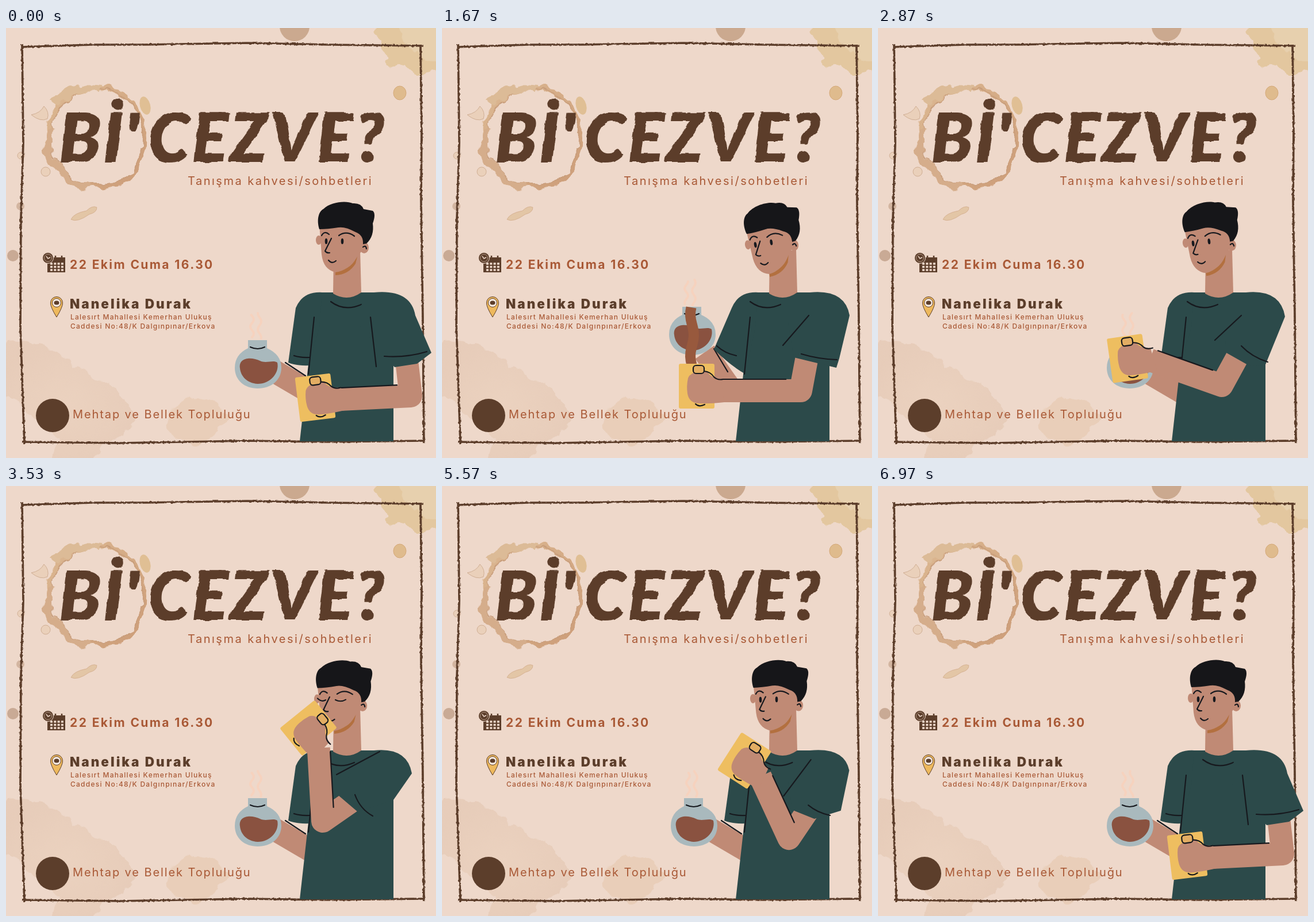
These frames come from a looping animation (748 by 748 pixels, 7010 ms). An HTML page:

```html
<!DOCTYPE html>
<html lang="tr">
<head>
<meta charset="utf-8">
<title>Bi' Cezve?</title>
<style>
  html, body { margin: 0; width: 100%; height: 100%; overflow: hidden; background: #eed8ca; }
  svg { display: block; width: 100vw; height: 100vh; }
  text { font-family: Inter, "Open Sans", sans-serif; fill: #a95936; }
  .title { font: italic 900 118px Lato, "Open Sans", sans-serif; letter-spacing: 3px; fill: #5c3e2b; }
  .light { font-size: 20px; font-weight: 400; }
  .date { font-size: 21px; font-weight: 700; letter-spacing: 2.4px; }
  .place { font-size: 22.5px; font-weight: 900; letter-spacing: 3px; fill: #5c3e2b; }
  .address { font-size: 12px; font-weight: 500; letter-spacing: 1.25px; }
  .ink { fill: none; stroke: #17191e; stroke-width: 2.2; stroke-linecap: round; stroke-linejoin: round; }
  .skin { fill: #c08a75; }
  .limb { fill: none; stroke: #c08a75; stroke-width: 40; stroke-linejoin: round; }
  .shirt { fill: #2c4a4a; }
  .brown { fill: #5c3e2b; }
</style>
</head>
<body>
<svg viewBox="0 0 748 748">
  <defs>
    <filter id="blotch" x="-20%" y="-20%" width="140%" height="140%">
      <feTurbulence type="fractalNoise" baseFrequency=".035" numOctaves="3" seed="4"/>
      <feDisplacementMap in="SourceGraphic" scale="22" xChannelSelector="R" yChannelSelector="G"/>
    </filter>
    <filter id="crayon" filterUnits="userSpaceOnUse" x="0" y="0" width="748" height="748">
      <feTurbulence type="fractalNoise" baseFrequency=".22" numOctaves="2" seed="7"/>
      <feDisplacementMap in="SourceGraphic" scale="3.5" xChannelSelector="R" yChannelSelector="G"/>
    </filter>
    <filter id="brush" filterUnits="userSpaceOnUse" x="0" y="0" width="748" height="748">
      <feTurbulence type="fractalNoise" baseFrequency=".05" numOctaves="2" seed="3"/>
      <feDisplacementMap in="SourceGraphic" scale="6" xChannelSelector="R" yChannelSelector="G"/>
    </filter>
    <linearGradient id="ringTone" x2="1" y2="1">
      <stop offset="0" stop-color="#dcb892"/><stop offset="1" stop-color="#cc9c77"/>
    </linearGradient>
    <radialGradient id="stainTone">
      <stop offset="0" stop-color="#e9cfba"/><stop offset="1" stop-color="#e3c7b2"/>
    </radialGradient>
  </defs>

  <rect width="748" height="748" fill="#eed8ca"/>

  <g filter="url(#blotch)">
    <path fill="url(#stainTone)" opacity=".7" d="M-20 550C45 535 95 560 118 590C160 605 190 620 225 680C225 705 190 712 170 725L145 765H75L90 715C50 680 15 640-20 625Z"/>
    <path fill="#e7c9ad" opacity=".6" d="M277 680Q285 650 330 645Q368 645 382 672Q375 705 352 712Q325 748 312 715Q280 710 277 680Z"/>
    <path fill="#e3c79f" d="M635 5L665-20H775V80Q745 87 735 77Q720 92 705 72Q690 57 668 66Q655 60 668 48Q645 35 650 20Z"/>
    <path fill="#e9d3b2" opacity=".8" d="M680-10H765V62Q705 62 680-10Z"/>
  </g>
  <g filter="url(#blotch)" fill="none">
    <ellipse cx="158" cy="191" rx="85" ry="87" stroke="url(#ringTone)" stroke-width="8"/>
    <ellipse cx="159" cy="190" rx="81" ry="84" stroke="#c79c7a" stroke-width="1.5"/>
    <path d="M87 130Q118 97 162 105" stroke="#dcbb97" stroke-width="14"/>
    <path d="M77 175Q68 225 95 250Q110 272 145 277" stroke="#d5ad8b" stroke-width="10"/>
  </g>
  <circle cx="502" cy="-3" r="26" fill="#cba98f"/>
  <ellipse cx="685" cy="113" rx="11" ry="12" fill="#dfbb8d" stroke="#d3a878"/>
  <circle cx="12" cy="396" r="10" fill="#c9aa95"/>
  <circle cx="25" cy="310" r="7" fill="#d3b5a0"/>
  <ellipse cx="242" cy="135" rx="9" ry="16" transform="rotate(-15 242 135)" fill="#e0bf94"/>
  <path d="M113 333Q118 322 140 318Q150 308 158 312Q158 321 145 324Q124 339 113 333Z" fill="#e3c6a6" stroke="#d6b293"/>
  <g fill="#ead0ba" stroke="#cfae94">
    <path d="M44 151Q60 148 66 136Q76 146 72 158Q60 164 44 151Z"/>
    <circle cx="69" cy="250" r="8"/><circle cx="26" cy="222" r="6"/>
  </g>

  <g filter="url(#crayon)" fill="none" stroke="#5c3e2b" stroke-width="3.7">
    <path d="M27 33L150 29H240L420 26L560 29L726 31"/>
    <path d="M721 29L723 180L722 300L725 500L727 722"/>
    <path d="M726 718L560 720L420 718L200 722L28 720"/>
    <path d="M28 28L30 200L26 330L25 520L32 724"/>
  </g>

  <g filter="url(#brush)">
    <text class="title" x="92" y="233">Bİ'</text>
    <text class="title" x="247" y="233">CEZVE?</text>
  </g>
  <text class="light" x="316" y="273" letter-spacing="2.5">Tanışma kahvesi/sohbetleri</text>
  <text class="date" x="111" y="419">22 Ekim Cuma 16.30</text>
  <text class="place" x="111" y="488">Nanelika Durak</text>
  <text class="address" x="112" y="507">Lalesırt Mahallesi Kemerhan Ulukuş</text>
  <text class="address" x="112" y="523">Caddesi No:48/K Dalgınpınar/Erkova</text>
  <text class="light" x="116" y="679" letter-spacing="1.9">Mehtap ve Bellek Topluluğu</text>

  <g class="brown">
    <circle cx="81" cy="674" r="29"/>
    <path d="M72 399H103V425H72Z"/>
    <path d="M77 410H100M77 415.5H100M77 421H100" stroke="#eed8ca" stroke-width="3.6" stroke-dasharray="4 2.3"/>
    <path d="M86 396V402M97 396V402" stroke="#5c3e2b" stroke-width="2.5"/>
    <circle cx="73" cy="400" r="9.5" stroke="#eed8ca"/>
    <circle cx="73" cy="400" r="6.5" fill="none" stroke="#b59a86"/>
    <path d="M70 397L73 401L77 399" fill="none" stroke="#eed8ca" stroke-width="1.4"/>
    <path d="M88 503Q77 485 77.500 478A10.500 10.500 0 0 1 98.500 478Q99 485 88 503Z" fill="#eeb95d" stroke="#5c3e2b"/>
    <circle cx="88" cy="478" r="7.500" fill="#f6e9df" stroke="#5c3e2b"/>
    <ellipse cx="88" cy="478" rx="4.500" ry="3.500"/>
  </g>

  <path id="leftArm" class="limb"/>
  <path id="leftArmLine" class="ink"/>
  <g id="pot">
    <g fill="none" stroke="#f7d2bd" stroke-width="4" stroke-linecap="round" opacity=".85">
      <path id="steamA"/><path id="steamB"/>
    </g>
    <path fill="#a9b9bd" d="M421 543H454V557Q479 568 479 591C479 613 461 627 438 627S398 613 398 591Q398 568 421 557Z"/>
    <path fill="#8a5240" d="M407 592C404 572 428 572 442 579C452 584 465 577 472 582C476 600 460 619 438 619C418 618 408 604 407 592Z"/>
    <path class="ink" d="M425 555Q438 561 450 555"/>
  </g>
  <path id="stream" fill="none" stroke="#98593d" stroke-width="18"/>

  <path class="shirt" d="M511 719L526 585L512 480Q523 460 550 460H650Q674 465 674 500V719Z"/>
  <path id="leftSleeve" class="shirt"/>
  <path id="leftHem" class="ink"/>
  <path class="ink" d="M536 503L526 602"/>
  <path class="skin" d="M570 395L569 462Q594 477 618 460L616 385Z"/>
  <path id="collar" class="ink"/>

  <g id="head">
    <ellipse class="skin" cx="544" cy="369" rx="5" ry="8"/>
    <ellipse class="skin" cx="623" cy="382" rx="8" ry="10"/>
    <path fill="#b3703f" d="M573 420Q600 424 612 394L608 410Q596 429 573 430Z"/>
    <path class="skin" d="M545 342L549 394Q552 420 573 425Q596 422 611 398L622 384V335Z"/>
    <path fill="#161619" d="M545 350C540 333 544 319 552 315C565 302 592 300 603 305Q618 304 622 315L638 318Q644 323 638 340Q641 362 627 375L621 376Q622 360 608 355Q590 345 578 347Q560 350 545 350Z"/>
    <path class="ink" d="M549 361Q554 352 562 359M579 361Q592 352 606 362M566 366L555 388Q558 392 563 391M561 404Q567 411 574 405M621 381Q626 377 627 384"/>
    <g id="eyesOpen" fill="#17191e">
      <ellipse cx="557" cy="371" rx="2.300" ry="5"/><ellipse cx="585" cy="371" rx="2.300" ry="5"/>
    </g>
    <path id="eyesShut" class="ink" d="M545 368Q552 375 559 371M576 371Q585 376 594 371"/>
  </g>

  <path id="arm" class="limb"/>
  <path id="sleeve" class="shirt"/>
  <path id="hem" class="ink"/>
  <path id="fold" class="ink"/>
  <path id="armLine" class="ink"/>
  <g id="mug">
    <rect x="-31" y="-39" width="62" height="78" rx="3" fill="#eebe60"/>
    <path class="ink" d="M-2 31Q4 37 14 32"/>
    <path class="skin" d="M-15-14Q-11-24 4-25H18Q27-12 42-13L48 28Q20 31 5 30Q-13 30-16 13Q-18 0-15-14Z"/>
    <rect class="ink" x="-6" y="-36" width="19" height="14" rx="5" style="fill:#e2ad63"/>
    <path class="ink" d="M13-26Q24-25 30-16Q36-10 46-12"/>
  </g>
</svg>

<script>
const LOOP = 7010;
const el = Object.fromEntries([...document.querySelectorAll("[id]")].map(e => [e.id, e]));

// mug and head: x, y, angle; other parts: lists of points
const rest = {
  mug: [538, 643, -7], head: [0, 0, 0], elbow: [704, 640, 695, 560], collar: [565],
  sleeve: [712, 500, 740, 565, 715, 584, 676, 590], hem: [658, 571, 695, 574, 732, 563], fold: [634, 503, 644, 589]
};
const fill = {
  mug: [443, 623, 0], head: [-12, 4, -9], elbow: [624, 631, 641, 540], collar: [536],
  sleeve: [709, 500, 691, 575, 686, 591, 612, 573], hem: [625, 567, 655, 576, 687, 577], fold: [638, 500, 593, 552]
};
const lift = {
  mug: [434, 575, -8], head: [-9, 2, -7], elbow: [598, 622, 640, 545], collar: [538],
  sleeve: [708, 502, 673, 588, 645, 587, 606, 565], hem: [632, 553, 650, 572, 678, 581], fold: [632, 500, 586, 543]
};
const drink = {
  mug: [526, 421, 51], head: [-3, 1, -1], elbow: [551, 583, 620, 535], collar: [553],
  sleeve: [706, 500, 674, 546, 612, 567, 578, 538], hem: [607, 537, 616, 562, 638, 574], fold: [650, 462, 575, 502]
};
const lower = {
  mug: [526, 556, 10], head: [-3, 0, -1], elbow: [666, 641, 668, 580], collar: [561],
  sleeve: [711, 490, 719, 582, 690, 590, 648, 588], hem: [665, 572, 690, 575, 716, 571], fold: [634, 493, 620, 578]
};
const poses = [[0, rest], [580, fill], [2400, fill], [2870, lift], [3500, drink],
  [5150, drink], [5970, lower], [6800, rest], [LOOP, rest]];
// x, y and how far the pouring arm is raised
const potKeys = [[0, [0, 0, 0]], [450, [2, 8, -0.4]], [700, [2, 8, -0.4]], [1250, [-3, -58, 1]],
  [1850, [-3, -58, 1]], [2350, [0, 0, 0]], [LOOP, [0, 0, 0]]];

const mix = (a, b, k) => a + (b - a) * k;

// Smooth curve through the keys that never overshoots them
function track(keys, t) {
  let i = 0;
  while (i < keys.length - 2 && t >= keys[i + 1][0]) i++;
  const slope = (j, n) => j < 0 || j > keys.length - 2 ? 0
    : (keys[j + 1][1][n] - keys[j][1][n]) / (keys[j + 1][0] - keys[j][0]);
  const tangent = (j, n) => {
    const a = slope(j - 1, n), b = slope(j, n);
    return a * b <= 0 ? 0 : 2 * a * b / (a + b);
  };
  const span = keys[i + 1][0] - keys[i][0], u = (t - keys[i][0]) / span;
  return keys[i][1].map((from, n) =>
    mix(from, keys[i + 1][1][n], u * u * (3 - 2 * u))
    + span * u * (1 - u) * ((1 - u) * tangent(i, n) - u * tangent(i + 1, n)));
}

const draw = (id, d) => el[id].setAttribute("d", d);
const place = (id, value) => el[id].setAttribute("transform", value);
const show = (id, on) => el[id].setAttribute("visibility", on ? "visible" : "hidden");

function wave(x, top, bottom, size, phase) {
  let d = "";
  for (let k = 0; k <= 16; k++) {
    const y = mix(bottom, top, k / 16);
    d += `${k ? "L" : "M"}${x + size * Math.sin(k * 0.62 + phase)} ${y}`;
  }
  return d;
}

function drawMugArm(p) {
  const [mx, my, angle] = p.mug, [ex, ey, ux, uy] = p.elbow;
  const a = angle * Math.PI / 180;
  const wx = mx + 38 * Math.cos(a) - 8 * Math.sin(a);
  const wy = my + 38 * Math.sin(a) + 8 * Math.cos(a);
  place("mug", `translate(${mx} ${my}) rotate(${angle})`);
  draw("arm", `M${ux} ${uy}L${ex} ${ey}L${wx} ${wy}`);

  const length = Math.hypot(ex - wx, ey - wy);
  const turn = Math.atan2(ey - wy, ex - wx) * 180 / Math.PI;
  place("armLine", `translate(${wx} ${wy}) rotate(${turn})`);
  draw("armLine", `M8-20H${length * 0.82}`);

  const [sx, sy, ox, oy, hx, hy, ix, iy] = p.sleeve;
  draw("sleeve", `M600 500L640 460Q${sx - 8} 454 ${sx} ${sy}L${ox} ${oy}L${hx} ${hy}L${ix} ${iy}Z`);
  const [x1, y1, cx, cy, x2, y2] = p.hem;
  draw("hem", `M${x1} ${y1}Q${cx} ${cy} ${x2} ${y2}`);
  const [fx, fy, gx, gy] = p.fold;
  draw("fold", `M${fx} ${fy}L${gx} ${gy}`);
}

function drawPotArm([px, py, k], t) {
  place("pot", `translate(${px} ${py})`);
  draw("leftArm", `M${mix(465, 457, k)} ${mix(596, 564, k)}L${mix(540, 502, k)} ${mix(640, 628, k)}`);
  draw("leftArmLine", `M${mix(486, 473, k)} ${mix(582, 558, k)}L${mix(521, 497, k)} ${mix(605, 598, k)}`);
  draw("leftSleeve", `M550 460Q516 458 504 487L${mix(491, 473, k)} ${mix(582, 559, Math.max(k, 0))}`
    + `Q505 ${mix(588, 590, k)} 528 ${mix(587, 602, Math.max(k, 0))}L545 520Z`);
  draw("leftHem", `M${mix(501, 478, k)} ${mix(570, 553, k)}Q${mix(514, 492, k)} ${mix(574, 566, k)} `
    + `${mix(528, 512, k)} ${mix(573, 570, k)}`);

  const phase = t / LOOP * Math.PI * 28;
  draw("steamA", wave(428, 499, 538, 3, -phase));
  draw("steamB", wave(441, 496, 540, 3, 1.2 - phase));
  show("stream", t > 600 && t < 2250);
  draw("stream", wave(438 + px, 544 + py, 600, 3, phase));
}

function render(t) {
  const p = {};
  for (const part in rest) p[part] = track(poses.map(([time, pose]) => [time, pose[part]]), t);
  const [hx, hy, tilt] = p.head, c = p.collar[0];
  place("head", `translate(${hx} ${hy}) rotate(${tilt} 571 371)`);
  draw("collar", `M${c} 476Q${c + 24} 494 ${c + 53} 481`);
  const shut = t > 3450 && t < 5200;
  show("eyesOpen", !shut);
  show("eyesShut", shut);
  drawPotArm(track(potKeys, t), t);
  drawMugArm(p);
}

const start = performance.now();
function frame() {
  render((performance.now() - start) % LOOP);
  requestAnimationFrame(frame);
}
frame();
</script>
</body>
</html>
```
